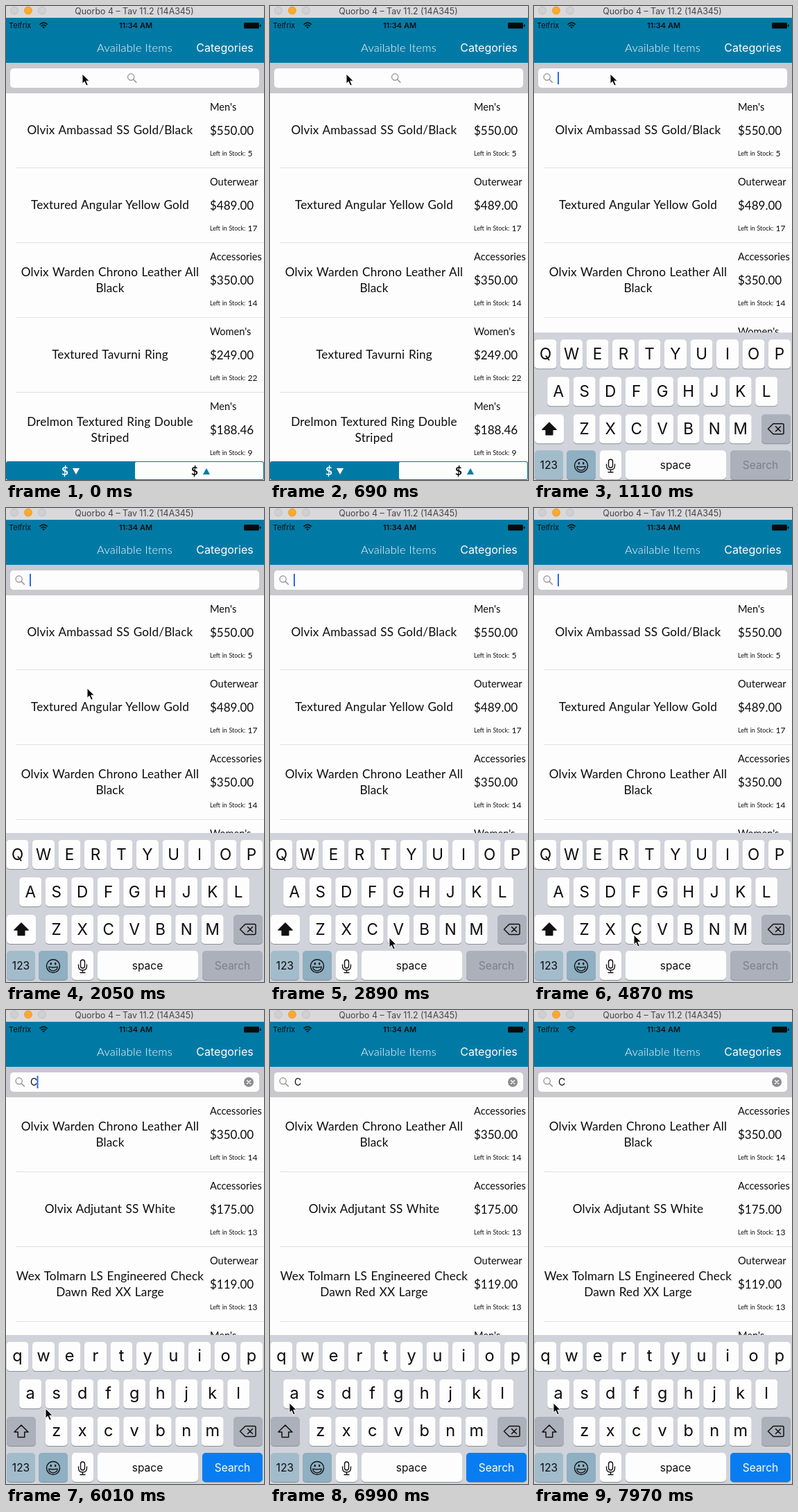
These frames come from a looping animation (372x684 px, 8 s). An HTML page:

```html
<!DOCTYPE html>
<html lang="en">
<head>
<meta charset="utf-8">
<title>Item list search</title>
<style>
html, body { margin: 0; width: 100%; height: 100%; overflow: hidden; background: #fdfdfd; }
svg { display: block; width: 372px; height: 684px; }
text { fill: #0c0c0e; white-space: pre; }
.ui { font-family: Inter, Roboto, sans-serif; }
.body { font-family: Lato, "Open Sans", sans-serif; }
.name { letter-spacing: .15px; word-spacing: 1px; text-anchor: middle; }
.mid { text-anchor: middle; }
.white { fill: #fff; }
</style>
</head>
<body>
<svg id="stage" viewBox="0 0 372 684" xmlns="http://www.w3.org/2000/svg"></svg>
<script>
const LOOP = 8000, TAP = 750, TYPED = 5450;
const BLUE = '#007aa5', PAPER = '#fdfdfd', BAR = '#c8c8cd', GREY = '#abb0ba', LENS = '#8b8b90';

const stage = document.getElementById('stage');
const NS = stage.namespaceURI;

function add(parent, tag, attrs = {}, label) {
  const node = document.createElementNS(NS, tag);
  for (const key in attrs) node.setAttribute(key, attrs[key]);
  if (label !== undefined) node.textContent = label;
  parent.appendChild(node);
  return node;
}
const group = (parent = stage) => add(parent, 'g');
const rect = (parent, x, y, width, height, fill, rx = 0) =>
  add(parent, 'rect', { x, y, width, height, fill, rx });
const path = (parent, d, attrs) => add(parent, 'path', { d, ...attrs });
const text = (parent, x, y, size, label, cls = 'body', attrs = {}) =>
  add(parent, 'text', { x, y, 'font-size': size, class: cls, ...attrs }, label);
const line = (width, stroke = '#111') => ({
  fill: 'none', stroke, 'stroke-width': width, 'stroke-linecap': 'round', 'stroke-linejoin': 'round'
});
const show = (node, on) => node.setAttribute('display', on ? 'inline' : 'none');
const move = (node, x, y) => node.setAttribute('transform', `translate(${x.toFixed(2)} ${y.toFixed(2)})`);

// Item rows: name lines, category, price, stock
const allItems = [
  [['Olvix Ambassad SS Gold/Black'], "Men's", '$550.00', 5],
  [['Textured Angular Yellow Gold'], 'Outerwear', '$489.00', 17],
  [['Olvix Warden Chrono Leather All', 'Black'], 'Accessories', '$350.00', 14],
  [['Textured Tavurni Ring'], "Women's", '$249.00', 22],
  [['Drelmon Textured Ring Double', 'Striped'], "Men's", '$188.46', 9]
];
const matches = [
  allItems[2],
  [['Olvix Adjutant SS White'], 'Accessories', '$175.00', 13],
  [['Wex Tolmarn LS Engineered Check', 'Dawn Red XX Large'], 'Outerwear', '$119.00', 13],
  [[], "Men's", '', '']
];

function buildList(items) {
  const list = group();
  items.forEach(([names, category, price, stock], i) => {
    const y = 126 + i * 108;
    names.forEach((label, n) =>
      text(list, 150, y + 59 + (n - (names.length - 1) / 2) * 23, 17.2, label, 'body name'));
    text(list, 294, y + 25, 14.6, category);
    text(list, 294, y + 59.5, 17, price);
    if (price) {
      text(list, 294, y + 90, 8.8, 'Left in Stock:', 'body', { 'word-spacing': 0.6 });
      text(list, 348.5, y + 90.5, 12, stock);
    }
    rect(list, 14, y + 107, 358, 1, '#e1e1e4');
  });
  return list;
}

rect(stage, 0, 0, 372, 684, PAPER);
const fullList = buildList(allItems);
const foundList = buildList(matches);

function buildSortBar() {
  const bar = group();
  rect(bar, 0, 657, 372, 27, BLUE, 3);
  rect(bar, 186, 658, 185, 25, PAPER, 2);
  text(bar, 85, 677, 17, '$', 'body mid white', { 'font-weight': 700 });
  path(bar, 'M96 667h10l-5 9z', { fill: '#fff' });
  text(bar, 272, 677, 17, '$', 'body mid', { 'font-weight': 700 });
  path(bar, 'M284 676h10l-5 -9z', { fill: BLUE });
}

function buildHeader() {
  const head = group();
  rect(head, 0, 0, 372, 17.5, '#d9d9db');
  [12, 32, 52].forEach((cx, i) => add(head, 'circle', {
    cx, cy: 6.5, r: 5.5, fill: i === 1 ? '#fda92c' : '#d0d0d2', stroke: i === 1 ? '#df9426' : '#b9b9bc', 'stroke-width': 0.7
  }));
  text(head, 185, 11.5, 12.4, 'Quorbo 4 – Tav 11.2 (14A345)', 'ui mid', { style: 'fill:#434346' });
  rect(head, 0, 17, 372, 65, BLUE);
  text(head, 4, 32, 11, 'Telfrix', 'ui');
  text(head, 187, 32, 11, '11:34 AM', 'ui mid', { 'font-weight': 600 });
  path(head, 'M49 26.3q5.2-4.2 10.4 0M51 28.7q3.2-2.4 6.4 0', line(1.6));
  path(head, 'M52.3 30.5q1.9-1.3 3.8 0l-1.9 2z', { fill: '#111' });
  rect(head, 343, 24, 22, 8.5, '#0a0a0a', 1.5);
  rect(head, 366, 26.5, 1.5, 3.5, '#0a0a0a', 0.7);
  text(head, 185.5, 66, 16.5, 'Available Items', 'body mid white', { 'font-weight': 300, 'letter-spacing': 0.2 });
  text(head, 315.5, 66, 16, 'Categories', 'ui mid white');
  rect(head, 0, 82, 372, 44, BAR);
  rect(head, 6, 90, 359, 28, PAPER, 5);
}

buildSortBar();
buildHeader();

const lens = group();
add(lens, 'circle', { cx: -1.3, cy: -1.5, r: 4.6, ...line(1.2, LENS) });
path(lens, 'M2.2 2l4.3 4.3', line(1.3, LENS));

const query = group();
text(query, 35, 109, 14, 'C', 'ui');
add(query, 'circle', { cx: 350, cy: 104, r: 7, fill: LENS });
path(query, 'M347.4 101.4l5.2 5.2m0 -5.2l-5.2 5.2', line(1.4, PAPER));
const caret = rect(stage, 34, 95, 2, 18, '#2f6be6');

// Keyboard
const board = group();
rect(board, 0, 469, 372, 216, '#d0d3da');

function keyCap(parent, x, y, w, fill = PAPER) {
  rect(parent, x, y + 1, w, 42, '#8b8e95', 5);
  return rect(parent, x, y, w, 42, fill, 5);
}

const caps = group(board), upper = group(board), lower = group(board);
[['QWERTYUIOP', 16.5, 479], ['ASDFGHJKL', 35.2, 533], ['ZXCVBNM', 72.7, 587]].forEach(([keys, x0, y]) => {
  [...keys].forEach((letter, i) => {
    const x = x0 + i * 37.5;
    keyCap(caps, x - 16, y, 32);
    text(upper, x, y + 29, 22.5, letter, 'ui mid');
    text(lower, x, y + 28, 23.5, letter.toLowerCase(), 'ui mid');
  });
});

const shiftCap = keyCap(board, 1, 587, 42);
const shiftArrow = path(board, 'M22 599l10 10h-5.2v7.5h-9.6v-7.5h-5.2z', line(1.5));
keyCap(board, 328, 587, 42, GREY);
path(board, 'M345 600.5h13q2 0 2 2v11q0 2-2 2h-13l-7.5 -7.5zM348.5 604.5l7 7m0 -7l-7 7', line(1.5));

keyCap(board, 1, 639, 41, '#a3bccb');
text(board, 21.5, 666, 15.5, '123', 'ui mid');
keyCap(board, 47, 639, 42, '#8fafc2');
add(board, 'circle', { cx: 68, cy: 661, r: 9.5, ...line(1.4) });
path(board, 'M61.8 662.2q6.2 1.6 12.4 0a6.2 5.6 0 0 1 -12.4 0z', line(1.3));
[64.8, 71.2].forEach(cx => add(board, 'ellipse', { cx, cy: 657.6, rx: 1.2, ry: 1.9, fill: '#111' }));
keyCap(board, 95, 639, 31);
add(board, 'rect', { x: 107.5, y: 652, width: 6, height: 12, rx: 3, ...line(1.4) });
path(board, 'M104.5 659v2q0 6 6 6t6-6v-2M110.5 667v3.5M107 670.5h7', line(1.3));
keyCap(board, 132, 639, 145);
text(board, 204, 665.5, 15.5, 'space', 'ui mid');
const goCap = keyCap(board, 283, 639, 87);
const goText = text(board, 326.5, 665.5, 15.5, 'Search', 'ui mid');

const pointer = group();
path(pointer, 'M0 0v14.2l3.2-3 2.5 5.8 2.6-1.1-2.5-5.7h4.5z',
  { fill: '#080808', stroke: '#fff', 'stroke-width': 1, 'stroke-linejoin': 'round' });

// Pointer stops: time, x, y
const route = [
  [0, 110, 98], [1400, 110, 98], [2050, 117, 260], [2800, 172, 620], [3800, 172, 620],
  [4500, 144, 616], [5550, 144, 616], [6010, 57, 575], [6800, 28, 567], [LOOP, 28, 567]
];

function pointerAt(t) {
  const i = route.findIndex(stop => stop[0] > t);
  const [t0, x0, y0] = route[i - 1], [t1, x1, y1] = route[i];
  const k = (t - t0) / (t1 - t0), e = k * k * (3 - 2 * k);
  return [x0 + (x1 - x0) * e, y0 + (y1 - y0) * e];
}

// Remaining share of a critically damped spring
function spring(ms) {
  if (ms <= 0) return 1;
  if (ms > 440) return 0;
  const a = ms * 0.01826;
  return (1 + a) * Math.exp(-a);
}

const clamp = v => Math.max(0, Math.min(1, v));

function caretAlpha(t) {
  if (t < TAP) return 0;
  if (t < 1350 || (t >= TYPED && t < 6450)) return 1;
  const phase = (t + (t < TYPED ? 0 : 620)) % 1000;
  return clamp(Math.max((400 - phase) / 100, (phase - 730) / 100));
}

function render(t) {
  const typed = t >= TYPED;
  show(fullList, !typed);
  show(foundList, typed);
  show(query, typed);
  show(upper, !typed);
  show(lower, typed);
  move(lens, 20 + 161.5 * spring((t - TAP) * 1.4), 104);
  move(board, 0, 216 * spring(t - TAP));
  caret.setAttribute('x', typed ? 44.5 : 34);
  caret.setAttribute('opacity', caretAlpha(t));
  shiftCap.setAttribute('fill', typed ? GREY : PAPER);
  shiftArrow.setAttribute('fill', typed ? 'none' : '#111');
  goCap.setAttribute('fill', typed ? '#087df2' : GREY);
  goText.style.fill = typed ? '#fff' : '#7b7f88';
  move(pointer, ...pointerAt(t));
}

const start = performance.now();
function tick() {
  render((performance.now() - start) % LOOP);
  requestAnimationFrame(tick);
}
render(0);
requestAnimationFrame(tick);
</script>
</body>
</html>
```
